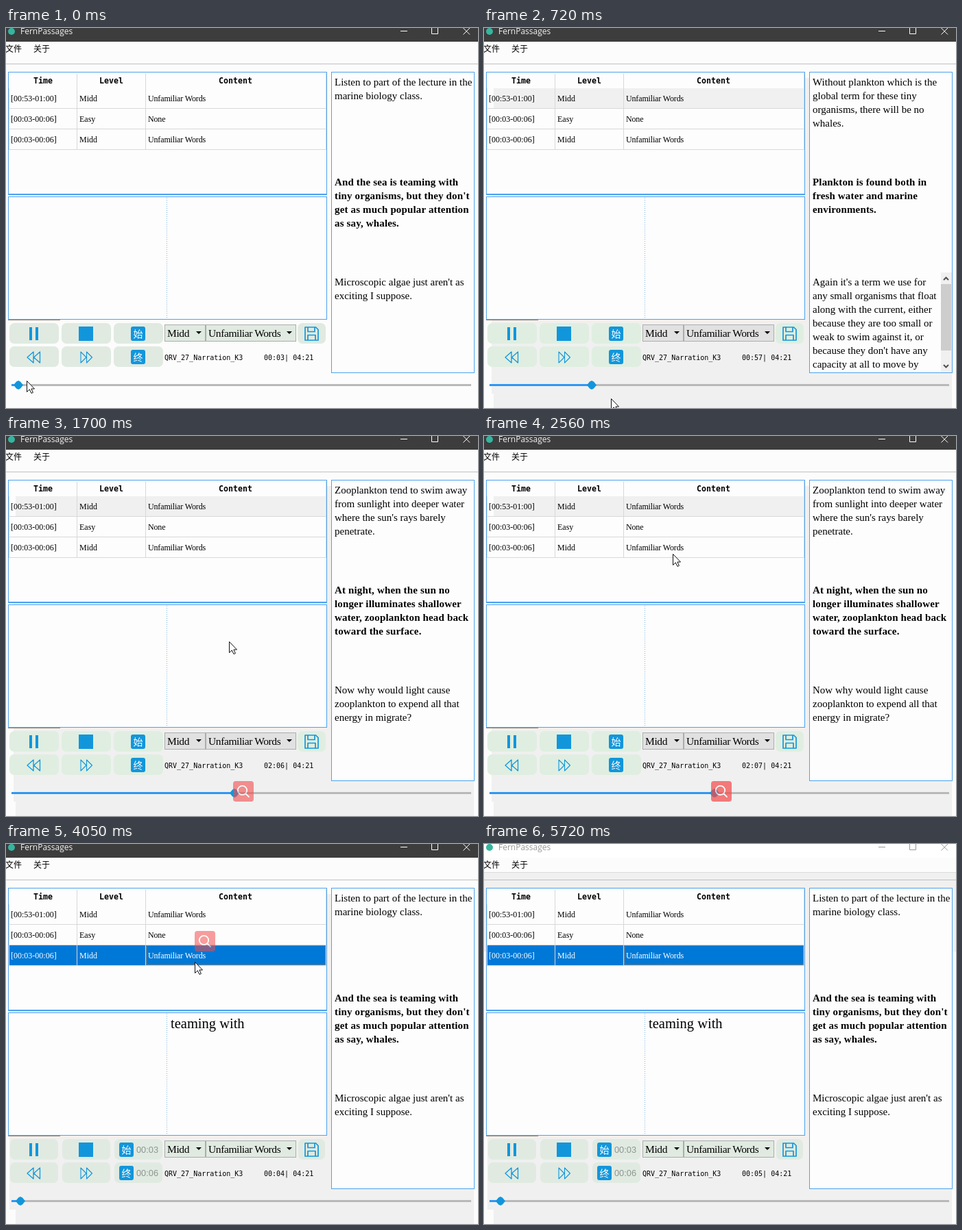
An HTML page for the animation above (5.82 s loop, 688x555 px).

```html
<!DOCTYPE html>
<html lang="en">
<head>
<meta charset="utf-8">
<title>Listening notes</title>
<style>
  html, body { margin: 0; width: 100%; height: 100%; overflow: hidden; background: #fcfcfc; }
  svg { display: block; }
  text { font-family: "Liberation Serif", serif; fill: #000; white-space: pre; }
  .ui { font: 12px "Open Sans", sans-serif; }
  .cjk { font: 12px "Noto Sans CJK SC", "Noto Sans CJK", sans-serif; }
  .head { font: bold 11.6px "DejaVu Sans Mono", monospace; }
  .mono { font: 10px "DejaVu Sans Mono", monospace; }
  .cell { font-size: 12px; }
  .wide { letter-spacing: -.15px; }
  .combo { font-size: 15.5px; letter-spacing: -.4px; }
  .para { font-size: 15px; }
  .bold { font-weight: bold; letter-spacing: .15px; }
  .mark { font: 12.8px "Liberation Sans", sans-serif; fill: #8c9690; }
  .line { fill: none; stroke: #1296db; }
  .blue { fill: #1296db; }
  .crisp { shape-rendering: crispEdges; }
  .selected { fill: #fff; }
</style>
</head>
<body>
<svg id="stage" width="688" height="555" viewBox="0 0 688 555">
  <defs>
    <clipPath id="panelClip"><rect x="475" y="65" width="207" height="438"/></clipPath>
  </defs>
  <rect width="688" height="555" fill="#fcfcfc"/>
  <g class="crisp" fill="#f0f0f0">
    <path id="grey" d="M11 73H682V555H14V534H11Z"/>
    <path id="greyLeft" d="M5 148H466V534H5Z"/>
    <path id="greyTop" d="M0 42H688V157H0Z"/>
  </g>
  <path id="menuLine" class="crisp" d="M0 41.5H688" stroke="#dcdcdc"/>
  <path class="crisp" d="M0 52.5H688" stroke="#bfbfbf"/>

  <rect id="titleBar" width="688" height="20"/>
  <circle cx="8" cy="5" r="5" fill="#35b5a0"/>
  <text id="title" class="ui" x="21" y="9">FernPassages</text>
  <path id="controls" fill="none" d="M575 4.5H585M620.5 -.5H629.5V8.5H620.5ZM666.5 0L676 9.5M676 0L666.5 9.5"/>
  <text class="cjk" x="-1" y="35">文件</text>
  <text class="cjk" x="40" y="35">关于</text>

  <g class="crisp">
    <rect x="3.5" y="64.5" width="464" height="178" fill="#fdfdfd" stroke="#4da3ee"/>
    <path d="M3 242.5H468" stroke="#4da3ee" stroke-width="2"/>
    <rect id="firstRow" x="14" y="88" width="452" height="29" fill="#f0f0f0"/>
    <path id="selection" d="M5 148H466V177H5Z" fill="#0078d7"/>
    <path d="M4.5 88V178M103.5 66V178M203.5 66V178M466.5 66V178M4 117.5H467M4 147.5H467M4 177.5H467" stroke="#d8d8d8" fill="none"/>
    <rect id="focus" x="204.5" y="148.5" width="261" height="28" fill="none" stroke="#e08238" stroke-dasharray="1 1"/>
    <rect x="3.5" y="246.5" width="464" height="179" fill="#fdfdfd" stroke="#4da3ee"/>
    <path d="M234.5 248V425" stroke="#7fb4e0" stroke-dasharray="1 2"/>
    <path d="M3 426.5H79" stroke="#8a8a8a"/>
    <rect x="474.5" y="64.5" width="208" height="439" fill="#fdfdfd" stroke="#4da3ee"/>
  </g>
  <text class="head" x="40" y="81">Time</text>
  <text class="head" x="136" y="81">Level</text>
  <text class="head" x="310" y="81">Content</text>
  <g id="rows"></g>
  <text id="note" x="240" y="269" font-size="20.5">teaming with</text>

  <g id="panel" clip-path="url(#panelClip)"></g>
  <g id="scroll" class="crisp">
    <rect x="666" y="357" width="16" height="146" fill="#f0f0f0"/>
    <rect x="666" y="374" width="15" height="97" fill="#cdcdcd"/>
    <path d="M670 368L673.5 364.5 677 368M670 492L673.5 495.5 677 492" fill="none" stroke="#505050" stroke-width="2" shape-rendering="auto"/>
  </g>

  <g id="buttons"></g>
  <path class="blue" d="M34 437H38V456H34ZM43 437H47V456H43ZM106 436H127V457H106Z"/>
  <g class="line" stroke-width="1.3" stroke-linejoin="round">
    <path d="M40 473V489L31 481ZM49.500 473V489L40.500 481Z"/>
    <path d="M109 473V489L117 481ZM117.500 473V489L125.500 481Z" stroke-width="1.1"/>
    <path d="M436 437H451.500L455 440.500V456H436ZM440 437V443.500H450V437M440 456V448.500H451V456" stroke-width="1.7"/>
  </g>
  <g id="marks"></g>
  <g id="combos" class="crisp" stroke="#adadad">
    <rect x="231.5" y="433.5" width="59" height="24"/>
    <rect x="291.5" y="433.5" width="131" height="24"/>
  </g>
  <path d="M277 443H285L281 447ZM409 443H417L413 447Z"/>
  <text class="combo" x="235" y="451">Midd</text>
  <text class="combo" x="295" y="451">Unfamiliar Words</text>
  <text class="mono" x="231" y="485">QRV_27_Narration_K3</text>
  <text id="clock" class="mono" x="376" y="485"></text>

  <path class="crisp" d="M8 521.5H678" stroke="#b9b9b9" stroke-width="3"/>
  <path id="played" class="crisp" stroke="#2f96f3" stroke-width="3"/>
  <path id="handle" class="blue" d="M-7 0L-3 -5 0 -6.500 3 -5 7 0 3 5 0 6.500 -3 5Z"/>

  <g id="lens">
    <rect width="30" height="30" rx="4" fill="#f34c4c"/>
    <g fill="none" stroke="#fff" stroke-width="1.8" stroke-linecap="round">
      <circle cx="13.500" cy="13.500" r="6.700"/><path d="M18.500 18.500L23 23"/>
    </g>
  </g>
  <path id="cursor" d="M.5 .5V16.500L4.300 12.900 7 18.500 9.400 17.400 6.900 12H11.500Z" fill="#fff" stroke="#111"/>
</svg>
<script>
const LOOP = 5820;
const $ = id => document.getElementById(id);
const show = (id, on) => $(id).style.display = on ? '' : 'none';
const label = (cls, x, y, str) => `<text class="${cls}" x="${x}" y="${y}">${str}</text>`;

const passages = {
  intro: [
    'Listen to part of the lecture in the|marine biology class.',
    "And the sea is teaming with|tiny organisms, but they don't|get as much popular attention|as say, whales.",
    "Microscopic algae just aren't as|exciting I suppose."],
  plankton: [
    'Without plankton which is the|global term for these tiny|organisms, there will be no|whales.',
    'Plankton is found both in|fresh water and marine|environments.',
    "Again it's a term we use for|any small organisms that float|along with the current, either|because they are too small or|weak to swim against it, or|because they don't have any|capacity at all to move by"],
  night: [
    "Zooplankton tend to swim away|from sunlight into deeper water|where the sun's rays barely|penetrate.",
    'At night, when the sun no|longer illuminates shallower|water, zooplankton head back|toward the surface.',
    'Now why would light cause|zooplankton to expend all that|energy in migrate?']
};

// Each track lists [start time, value...]; a value holds until the next start.
const tracks = {
  passage: [[0, 'intro'], [490, 'plankton'], [840, 'night'], [3130, 'intro']],
  player: [[0, 3, 18], [250, 7, 28], [370, 13, 44], [490, 20, 62], [610, 26, 79],
    [720, 57, 157], [840, 94, 251], [960, 126, 333], [1940, 127, 336],
    [3130, 3, 18.5], [4050, 4, 21], [5010, 5, 24]],
  cursor: [[0, 30, 515], [130, 22, 516], [250, 34, 518], [370, 56, 524], [490, 86, 531],
    [610, 120, 536], [720, 185, 541], [840, 265, 546], [960, 332, 548], [1340, 338, 536],
    [1460, 352, 506], [1580, 350, 425], [1700, 325, 300], [1820, 295, 196],
    [1940, 287, 185], [2060, 281, 178], [2180, 277, 174], [2310, 275, 172],
    [4300, 368, 207], [4420, -50, -50]],
  lens: [[0, 0, 0, 0], [1580, 331, 504, .6], [1940, 331, 504, .72], [2920, 0, 0, 0],
    [3130, 275, 127, .58], [3810, 275, 127, .54], [5620, 0, 0, 0]]
};
const at = (name, t) => tracks[name].findLast(key => key[0] <= t).slice(1);
const time = s => [s / 60 | 0, s % 60].map(n => String(n).padStart(2, '0')).join(':');

function drawRows(selected) {
  const data = [['[00:53-01:00]', 'Midd', 'Unfamiliar Words'],
    ['[00:03-00:06]', 'Easy', 'None'], ['[00:03-00:06]', 'Midd', 'Unfamiliar Words']];
  $('rows').innerHTML = data.map((row, r) => row.map((str, c) =>
    label(`cell${c == 2 ? ' wide' : ''}${selected && r == 2 ? ' selected' : ''}`,
      [7, 107, 207][c], 107 + 30 * r, str)).join('')).join('');
}

function drawPassage(name) {
  $('panel').innerHTML = passages[name].map((para, p) => para.split('|').map((str, i) =>
    label(p == 1 ? 'para bold' : 'para', 479, 84 + 146 * p + 20 * i, str)).join('')).join('');
  show('scroll', name == 'plankton');
}

function drawButtons(selected, fill) {
  const inset = selected ? 1 : 0;
  const button = (x, y, w) =>
    `<rect x="${x + inset}" y="${y}" width="${w - 2 * inset}" height="30" rx="7" fill="${fill}"/>`;
  $('buttons').innerHTML = [5, 81, 157].map(x => button(x, 431, 72) + button(x, 465, 72)).join('')
    + button(425, 431, 41);
  const left = selected ? 165 : 182;
  $('marks').innerHTML = [['始', '00:03'], ['终', '00:06']].map(([sign, mark], i) => {
    const y = 436 + 34 * i;
    return `<rect class="blue" x="${left}" y="${y}" width="21" height="21" rx="3"/>`
      + `<text class="cjk" x="${left + 3.5}" y="${y + 15.5}" style="font-size:14px;fill:#fff">${sign}</text>`
      + (selected ? label('mark', 190, y + 15, mark) : '');
  }).join('');
}

function drawState(t) {
  const selected = t >= 2920, inactive = t >= 5620, tinted = t >= 130 && !selected;
  show('grey', t >= 130);
  show('greyLeft', selected);
  show('greyTop', inactive);
  show('menuLine', inactive);
  show('firstRow', t >= 130 && t < 3130);
  ['selection', 'focus', 'note'].forEach(id => show(id, selected));
  $('titleBar').setAttribute('fill', inactive ? '#fff' : '#3d3d3d');
  $('title').style.fill = inactive ? '#999' : '#f4f4f4';
  $('controls').setAttribute('stroke', inactive ? '#999' : '#fff');
  $('combos').setAttribute('fill', tinted ? '#e1e1e1' : '#e0eae1');
  drawRows(selected);
  drawButtons(selected, tinted ? '#dfeee0' : '#e0eae1');
}

const phases = [0, 130, 2920, 3130, 5620];
let phase, passage;

function render() {
  const t = (performance.now() - start) % LOOP;
  const nextPhase = phases.findLast(p => p <= t);
  if (nextPhase !== phase) drawState(phase = nextPhase);
  const [nextPassage] = at('passage', t);
  if (nextPassage !== passage) drawPassage(passage = nextPassage);

  const [seconds, x] = at('player', t);
  $('clock').textContent = `${time(seconds)}| ${time(261)}`;
  $('played').setAttribute('d', `M8 521.5H${x}`);
  $('handle').setAttribute('transform', `translate(${x} 521.5)`);
  $('cursor').setAttribute('transform', `translate(${at('cursor', t).join(' ')})`);
  const [lensX, lensY, opacity] = at('lens', t);
  $('lens').setAttribute('transform', `translate(${lensX} ${lensY})`);
  $('lens').setAttribute('opacity', opacity);
  requestAnimationFrame(render);
}

const start = performance.now();
render();
</script>
</body>
</html>
```
